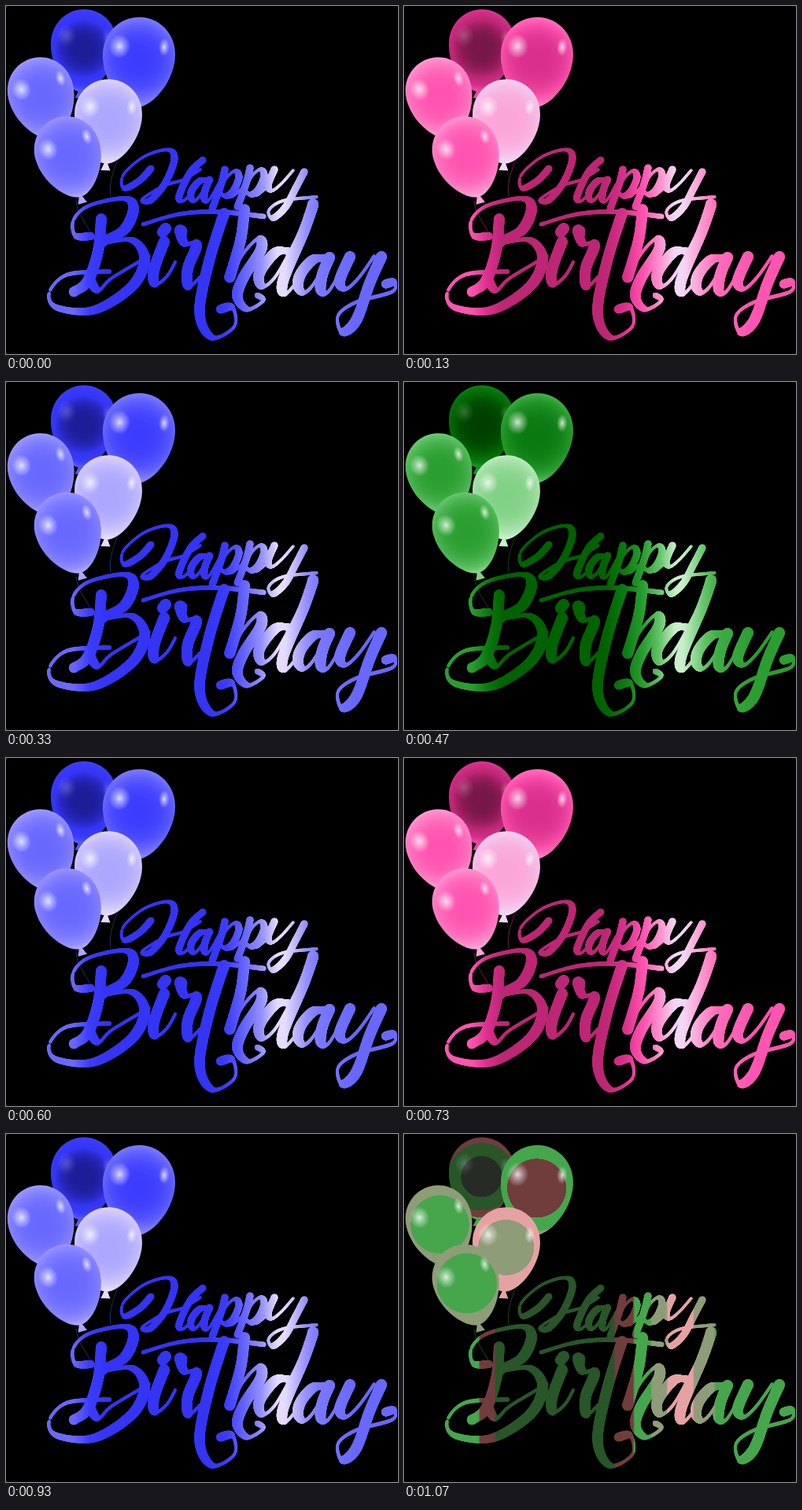
Recreate the animation shown at these times as an HTML page with a canvas. Size 498 by 443 pixels, loop 1210 ms.

```html
<!DOCTYPE html>
<html lang="en">
<head>
<meta charset="utf-8">
<title>Happy Birthday</title>
<style>
html, body { margin: 0; width: 100%; height: 100%; overflow: hidden; background: #000; }
canvas { display: block; }
</style>
</head>
<body>
<canvas id="stage" width="498" height="443" role="img" aria-label="Happy Birthday"></canvas>
<script>
const W = 498, H = 443;

// Six shades from dark to light; everything is coloured by a level 0..5
const ramps = {
  blue: ['#17177e', '#3434f4', '#3c3cff', '#6868ff', '#9490ff', '#e6dcff'],
  pink: ['#64133d', '#bc2674', '#d8308c', '#ff54b0', '#ff90cc', '#f2d8f6'],
  green: ['#003600', '#006200', '#0a7a10', '#2a9e30', '#62c468', '#c8f0ca'],
  mixed: ['#262b26', '#285628', '#713c3c', '#46a64c', '#8f9c78', '#e6a2a2']
};

const timeline = [[130, 'blue'], [200, 'pink'], [140, 'blue'], [130, 'green'],
  [130, 'blue'], [200, 'pink'], [140, 'blue'], [140, 'mixed']];
const loop = timeline.reduce((sum, [ms]) => sum + ms, 0);

// Key points of each pen path
const letters = {
  a: ['34,1 20,3 5,20 1,36 8,45 20,35 38,4', '41,0 32,22 30,42 40,43 60,9'],
  p: ['10,0 5,20 -6,50', '3,30 12,11 23,2 28,10 21,27 12,34 5,31', '12,34 20,34 32,24']
};
const happy = [
  '184,207 170,222 150,232 149,215 175,192 205,183 214,194 203,224 184,247 173,246 200,229 226,221 247,208',
  '250,196 234,212 220,242 225,248 236,238',
  '341,208 333,228 338,235 350,226 365,209',
  '379,211 368,232 355,256 339,270 334,260 352,248 395,243'
];
const birthday = [
  '108,293 88,292 86,272 106,254 150,245 162,258 150,285 122,301 160,298 176,322 160,357 112,387 65,384 55,365 78,342 132,338',
  '121,271 117,312 104,350 86,364',
  '106,346 117,362 135,346 182,318',
  '203,283 199,288',
  '201,300 188,336 190,354 206,342 221,312 228,288 221,286 227,302 242,304 231,334 232,357 247,345',
  '174,278 220,265 270,262 328,268',
  '277,264 258,325 246,390 262,422 290,408 288,384 272,386',
  '303,259 298,298 284,346',
  '286,342 303,313 321,296 324,310 302,345 294,370 307,386 327,375 319,368',
  '358,312 342,314 322,340 326,357 344,342 372,290 390,252 378,288 352,350 356,366 376,342',
  '437,319 424,350 432,360 448,346 468,318',
  '477,319 462,353 445,400 427,415 422,394 445,377 490,364 493,352 482,354'
];

// Back to front: x, y, radius, tilt, level in the middle, level at the rim
const balloons = [
  [99, 48, 42, .08, .2, 2.6],
  [169, 62, 46, .06, 2, 3.8],
  [44, 109, 42, -.24, 3, 4.4],
  [130, 138, 43, .05, 4.3, 5],
  [78, 184, 42, -.28, 3, 4.3]
];

// Light across the lettering: [position, level]
const sheen = [[0, 3], [.08, 3], [.17, 1], [.46, 1], [.57, 3], [.67, 5.2], [.78, 3.4], [.88, 3], [1, 3]];

const mix = (a, b, t) => a + (b - a) * t;

function sheenAt(x) {
  const i = Math.max(1, sheen.findIndex(([at]) => at >= x));
  const [x0, l0] = sheen[i - 1], [x1, l1] = sheen[i];
  return mix(l0, l1, (x - x0) / (x1 - x0));
}

function shade(name, level) {
  const ramp = ramps[name];
  const l = Math.max(0, Math.min(5, name === 'mixed' ? Math.round(level) : level));
  const i = Math.min(4, Math.floor(l));
  const channel = n => mix(...[i, i + 1].map(k => parseInt(ramp[k].substr(n, 2), 16)), l - i);
  return `rgb(${[1, 3, 5].map(channel)})`;
}

function fillLevels(gradient, name, levelAt) {
  for (let i = 0; i <= 200; i++) gradient.addColorStop(i / 200, shade(name, levelAt(i / 200)));
  return gradient;
}

function layer() {
  return Object.assign(document.createElement('canvas'), { width: W, height: H }).getContext('2d');
}

const spline = (a, b, c, d, t) =>
  b + t / 2 * (c - a + t * (2 * a - 5 * b + 4 * c - d + t * (3 * (b - c) + d - a)));

// Pointed pen: thick on downstrokes, thin on upstrokes
function write(g, path, thin, thick, left = 0, top = 0, scale = 1) {
  const pts = path.split(' ').map(p => p.split(',').map(Number));
  const at = i => pts[Math.max(0, Math.min(pts.length - 1, i))];
  const point = (i, t) => [0, 1].map(n =>
    [left, top][n] + scale * spline(at(i - 1)[n], at(i)[n], at(i + 1)[n], at(i + 2)[n], t));
  for (let i = 0; i < pts.length - 1; i++) {
    for (let t = 0; t < 1; t += .02) {
      const [x, y] = point(i, t), [nx, ny] = point(i, t + .02);
      const down = (.94 * (ny - y) - .35 * (nx - x)) / (Math.hypot(nx - x, ny - y) || 1);
      g.beginPath();
      g.arc(x, y, mix(thin, thick, ((1 + down) / 2) ** 1.5) / 2, 0, 7);
      g.fill();
    }
  }
}

function drawSpot(g, x, y, rx, ry) {
  g.save();
  g.translate(x, y);
  g.scale(rx, ry);
  const glow = g.createRadialGradient(0, 0, 0, 0, 0, 1);
  glow.addColorStop(0, '#fffffff0');
  glow.addColorStop(.35, '#ffffff90');
  glow.addColorStop(1, '#fff0');
  g.fillStyle = glow;
  g.fillRect(-1, -1, 2, 2);
  g.restore();
}

function drawBalloon(g, name, [x, y, r, tilt, core, rim]) {
  g.save();
  g.translate(x, y);
  g.rotate(tilt);
  g.scale(r, r);
  g.fillStyle = fillLevels(g.createRadialGradient(0, .15, 0, 0, .15, 1.25), name, t => mix(core, rim, t ** 3));
  g.fill(new Path2D('M-.03 1.4L-.14 1.66H.14L.03 1.4'));
  const body = new Path2D('M-1 0C-1 -.58-.56-1.04 0-1.04S1-.58 1 0C1 .75.4 1.46 0 1.46S-1 .75-1 0');
  g.fill(body);
  g.clip(body);
  g.globalAlpha = Math.min(.85, .15 + core * .35);
  drawSpot(g, -.55, -.2, .3, .34);
  drawSpot(g, .68, -.25, .15, .25);
  g.restore();
}

const lettering = layer();
happy.forEach(s => write(lettering, s, 3.5, 9));
letters.a.forEach(s => write(lettering, s, 3.5, 9, 234, 221, .6));
for (const [x, y] of [[268, 208], [300, 206]]) letters.p.forEach(s => write(lettering, s, 3.5, 9, x, y));
birthday.forEach(s => write(lettering, s, 4, 14));
letters.a.forEach(s => write(lettering, s, 4, 14, 370, 320));

function render(name) {
  const g = layer(), ink = layer();
  g.fillRect(0, 0, W, H);
  g.globalAlpha = .4;
  g.strokeStyle = shade(name, 3);
  g.stroke(new Path2D('M143 192C138 208 130 222 133 243M89 248C91 268 103 276 112 298'));
  g.globalAlpha = 1;
  balloons.forEach(b => drawBalloon(g, name, b));
  ink.drawImage(lettering.canvas, 0, 0);
  ink.globalCompositeOperation = 'source-in';
  ink.fillStyle = fillLevels(ink.createLinearGradient(50, 0, 496, 0), name, sheenAt);
  ink.fillRect(0, 0, W, H);
  g.drawImage(ink.canvas, 0, 0);
  return g.canvas;
}

const views = {};
for (const name in ramps) views[name] = render(name);

const view = document.getElementById('stage').getContext('2d');
const start = performance.now();

function tick() {
  let t = (performance.now() - start) % loop;
  const [, name] = timeline.find(([ms]) => (t -= ms) < 0);
  view.drawImage(views[name], 0, 0);
  requestAnimationFrame(tick);
}
tick();
</script>
</body>
</html>
```
